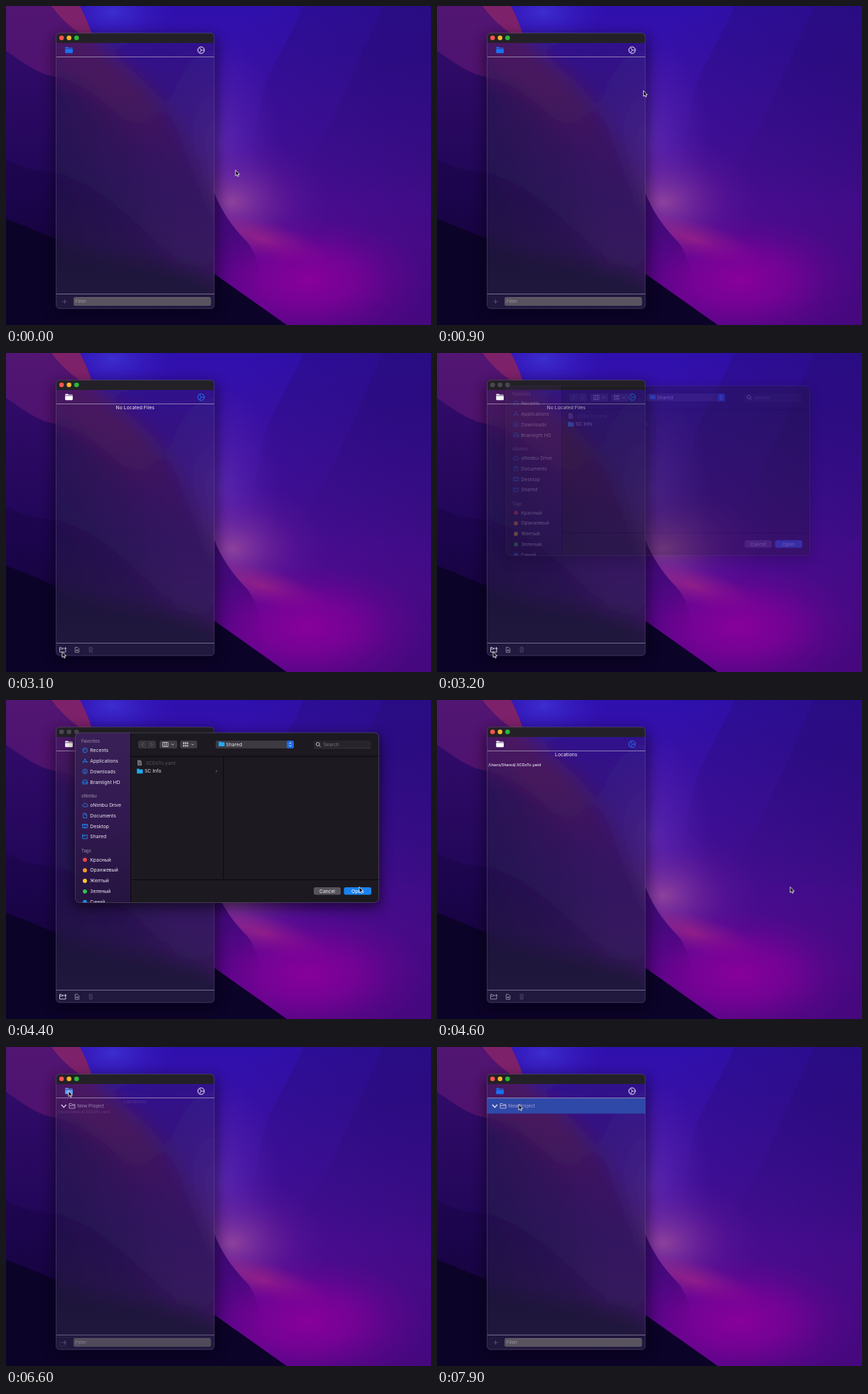
These frames come from a looping animation (598x448 px, 8000 ms). An HTML page:

```html
<!DOCTYPE html>
<html lang="en">
<head>
<meta charset="utf-8">
<title>Locating a file</title>
<style>
html, body { margin: 0; width: 100%; height: 100%; overflow: hidden; background: #1a0748; }
svg { display: block; width: 100vw; height: 100vh; }
text { font-family: Inter, "Noto Sans", sans-serif; white-space: pre; }
</style>
</head>
<body>
<svg id="stage" viewBox="0 0 598 448">
<defs>
  <linearGradient id="sky" x2="0" y2="1">
    <stop stop-color="#2f10ae"/><stop offset=".25" stop-color="#3b10a2"/><stop offset=".5" stop-color="#450f96"/>
    <stop offset=".75" stop-color="#560a92"/><stop offset="1" stop-color="#560686"/>
  </linearGradient>
  <linearGradient id="east">
    <stop offset=".55" stop-color="#2a0a70" stop-opacity="0"/><stop offset="1" stop-color="#2a0a70" stop-opacity=".38"/>
  </linearGradient>
  <linearGradient id="band" gradientUnits="userSpaceOnUse" x1="400" y1="60" x2="370" y2="260">
    <stop stop-color="#250a6c" stop-opacity=".27"/><stop offset="1" stop-color="#2c0870" stop-opacity="0"/>
  </linearGradient>
  <linearGradient id="mass" gradientUnits="userSpaceOnUse" x1="0" y1="0" x2="0" y2="448">
    <stop stop-color="#521572"/><stop offset=".25" stop-color="#4c126f"/>
    <stop offset=".6" stop-color="#400b78"/><stop offset=".8" stop-color="#4a0780"/><stop offset="1" stop-color="#5c068a"/>
  </linearGradient>
  <linearGradient id="shade" gradientUnits="userSpaceOnUse" x1="0" y1="70" x2="0" y2="448">
    <stop stop-color="#300b68"/><stop offset=".5" stop-color="#200656"/><stop offset="1" stop-color="#0c0224"/>
  </linearGradient>
  <linearGradient id="fadeEast" gradientUnits="userSpaceOnUse" x1="60" y1="0" x2="240" y2="0">
    <stop stop-color="#fff"/><stop offset="1" stop-color="#000"/>
  </linearGradient>
  <linearGradient id="tint" x2="0" y2="1">
    <stop stop-color="#241c3c" stop-opacity=".25"/><stop offset=".5" stop-color="#261e48" stop-opacity=".45"/>
    <stop offset="1" stop-color="#2a2348" stop-opacity=".72"/>
  </linearGradient>
  <linearGradient id="side" x2="0" y2="1">
    <stop stop-color="#392057"/><stop offset=".5" stop-color="#321a50"/><stop offset="1" stop-color="#251440"/>
  </linearGradient>
  <radialGradient id="magenta"><stop stop-color="#8a009c" stop-opacity=".95"/><stop offset=".4" stop-color="#84009a" stop-opacity=".7"/><stop offset=".75" stop-color="#80009a" stop-opacity=".2"/><stop offset="1" stop-color="#80009a" stop-opacity="0"/></radialGradient>
  <radialGradient id="pink"><stop stop-color="#9c4c9c" stop-opacity=".8"/><stop offset=".35" stop-color="#84369c" stop-opacity=".5"/><stop offset=".7" stop-color="#70209a" stop-opacity=".18"/><stop offset="1" stop-color="#6a1a98" stop-opacity="0"/></radialGradient>
  <radialGradient id="rose"><stop stop-color="#a82c80" stop-opacity=".75"/><stop offset=".5" stop-color="#a02884" stop-opacity=".4"/><stop offset="1" stop-color="#98208a" stop-opacity="0"/></radialGradient>
  <radialGradient id="violet"><stop stop-color="#6432b8" stop-opacity=".7"/><stop offset=".5" stop-color="#5c2ab4" stop-opacity=".35"/><stop offset="1" stop-color="#5424b0" stop-opacity="0"/></radialGradient>
  <radialGradient id="azure"><stop stop-color="#4034d8" stop-opacity=".8"/><stop offset="1" stop-color="#3418c0" stop-opacity="0"/></radialGradient>
  <radialGradient id="wine"><stop stop-color="#641868" stop-opacity=".6"/><stop offset=".5" stop-color="#5e1668" stop-opacity=".35"/><stop offset="1" stop-color="#5a1470" stop-opacity="0"/></radialGradient>
  <mask id="west"><rect width="598" height="448" fill="url(#fadeEast)"/></mask>
  <filter id="blur"><feGaussianBlur stdDeviation="13"/></filter>
  <filter id="soft" x="-20%" y="-20%" width="140%" height="140%"><feGaussianBlur stdDeviation="9"/></filter>
  <clipPath id="winClip"><rect x="70.5" y="38" width="222.5" height="387" rx="5"/></clipPath>
  <clipPath id="sheetClip"><rect x="97.5" y="46" width="427" height="238.5" rx="6"/></clipPath>
  <path id="edge" d="M0 0H104C112 15 117 28 121 40C145 68 186 92 212 126C248 172 270 228 293 262C302 286 318 310 338 330C352 345 362 380 372 448H0Z"/>
  <clipPath id="massClip"><use href="#edge"/></clipPath>

  <g id="wall">
    <rect width="598" height="448" fill="url(#sky)"/>
    <rect width="598" height="448" fill="url(#east)"/>
    <path d="M530 0C508 50 490 95 470 135C455 175 435 205 400 260H598V0Z" fill="url(#band)"/>
    <path d="M418 0C400 45 380 70 363 115C354 155 350 195 335 260H598V0Z" fill="url(#band)"/>
    <ellipse cx="150" cy="8" rx="90" ry="55" fill="url(#azure)"/>
    <ellipse cx="300" cy="195" rx="85" ry="150" fill="url(#violet)"/>
    <ellipse cx="318" cy="275" rx="135" ry="95" fill="url(#pink)"/>
    <ellipse cx="362" cy="328" rx="95" ry="27" fill="url(#rose)" transform="rotate(16 362 328)"/>
    <use href="#edge" fill="url(#mass)"/>
    <g clip-path="url(#massClip)">
      <ellipse cx="140" cy="115" rx="130" ry="115" fill="url(#wine)"/>
      <path d="M64 0H110L126 50C102 40 82 24 64 0Z" fill="#86246a" opacity=".85"/>
      <path d="M0 63C25 80 45 96 72 100C120 112 170 150 240 260V448H0Z" fill="url(#shade)" mask="url(#west)"/>
      <path d="M0 215C30 232 50 232 75 236C130 250 180 300 230 350V448H0Z" fill="#14033e" opacity=".35"/>
    </g>
    <ellipse cx="425" cy="385" rx="165" ry="88" fill="url(#magenta)"/>
    <path d="M0 299C40 313 60 325 90 333C150 355 230 350 293 376L395 448H0Z" fill="#0c0328"/>
  </g>

  <g id="addFolder" fill="none" stroke="currentColor" stroke-width=".8">
    <path d="M81 414.5H79L78 413.5H75.5V420H84V417"/><path d="M75.5 415.8H80.5"/><path d="M81.5 415H85.5M83.5 413V417"/>
  </g>
  <path id="folder" d="M83.2 59.6V58.8Q83.2 57.6 84.4 57.6H87L88.2 58.6H92.8Q93.9 58.6 93.9 59.6ZM83.2 60.2H93.9V65Q93.9 66.2 92.7 66.2H84.4Q83.2 66.2 83.2 65Z"/>
  <g id="gear" fill="none" stroke="currentColor" stroke-width=".9">
    <circle cx="274.5" cy="62" r="4.4"/><circle cx="274.5" cy="62" r="5" stroke-width=".6" stroke-dasharray=".9 .9"/>
    <path d="M278.5 62H274.7L272.6 58.5M274.7 62L272.6 65.5"/>
  </g>
</defs>

<use href="#wall"/>
<rect x="67" y="42" width="230" height="390" rx="8" fill="#05000f" opacity=".48" filter="url(#soft)"/>
<g clip-path="url(#winClip)">
  <use href="#wall" filter="url(#blur)"/>
  <rect x="70" y="38" width="224" height="388" fill="url(#tint)"/>
  <rect x="70" y="38" width="224" height="14" fill="#232127"/>
  <rect id="row" x="70" y="72" width="224" height="21.5" fill="#2f49a8"/>
  <path d="M71 71.5H293" stroke="#c9bcd8" stroke-opacity=".6"/>
</g>
<rect x="70.5" y="38" width="222.5" height="387" rx="5" fill="none" stroke="#a79bb8" stroke-opacity=".32" stroke-width=".8"/>
<g id="lights"></g>
<use id="filesTab" href="#folder"/>
<use id="gearTab" href="#gear"/>

<g id="filesView">
  <path d="M71 404.5H293" stroke="#c9bcd8" stroke-opacity=".5"/>
  <path d="M79.5 415H85.5M82.5 412V418" stroke="#5c5372" stroke-width=".9"/>
  <rect x="95" y="409" width="193.5" height="12" rx="2.5" fill="#59535f"/>
  <path d="M96 409.4H287" stroke="#77717c" stroke-width=".7"/>
  <g id="filter"></g>
</g>
<g id="project">
  <path d="M77.8 81L81.3 84.7L84.8 81" fill="none" stroke="#eee9f6" stroke-width="1.3"/>
  <path d="M89 86V79.5H92L93 80.7H97V86ZM89 82.3H97" fill="none" stroke="#c6bcd8" stroke-width=".9"/>
  <g id="projectName"></g>
</g>
<g id="placesView">
  <path d="M71 407.5H293" stroke="#c9bcd8" stroke-opacity=".5"/>
  <use id="addBtn" href="#addFolder"/>
  <g fill="none" stroke="#a49cb4" stroke-width=".8">
    <path d="M97.3 413.3H100.5L102.7 415.5V420.3H97.3ZM98.5 417.5H101.5M100 416V419"/>
    <path d="M116.3 414.3H122M118 414V413.2H120.3V414M117 414.5L117.4 420.3H121L121.4 414.5M118.4 416V419M120 416V419" stroke="#50476a"/>
  </g>
  <g id="none"></g>
  <g id="found"></g>
</g>

<g id="sheet">
  <rect x="95" y="50" width="432" height="242" rx="8" fill="#000" opacity=".55" filter="url(#soft)"/>
  <g clip-path="url(#sheetClip)">
    <rect x="97" y="46" width="78" height="239" fill="url(#side)"/>
    <rect x="175" y="46" width="350" height="239" fill="#1c1a20"/>
    <path d="M175.5 46V285M175 79.3H525M306 80V251M175 252.5H525" stroke="#09080c"/>
    <g id="sidebar"></g>
  </g>
  <rect x="97.5" y="46" width="427" height="238.5" rx="6" fill="none" stroke="#8a8590" stroke-opacity=".5" stroke-width=".7"/>
  <g id="controls"></g>
</g>
<path id="cursor" d="M0 0V8L1.8 6.4L3 9L4.4 8.4L3.2 5.9H5.6Z" fill="#08060c" stroke="#fff" stroke-width=".8"/>
</svg>

<script>
const $ = id => document.getElementById(id);
const LOOP = 8000, BLUE = '#1c8cf5', ACCENT = '#1a72f0';

const label = (x, y, str, size = 6.8, fill = '#ece8f2', extra = '') =>
  `<text x="${x}" y="${y}" font-size="${size}" fill="${fill}" ${extra}>${str}</text>`;
const box = (x, y, w, h, fill, r = 2.5) =>
  `<rect x="${x}" y="${y}" width="${w}" height="${h}" rx="${r}" fill="${fill}"/>`;
const line = (d, color, width = .9) =>
  `<path d="${d}" fill="none" stroke="${color}" stroke-width="${width}"/>`;
const middle = 'text-anchor="middle"';

const lights = [['#f4554b', 78.2], ['#f6b32c', 88.7], ['#27b93d', 99.3]];
$('lights').innerHTML = lights.map(([c, x]) => `<circle cx="${x}" cy="44.8" r="3.3" fill="${c}"/>`).join('');
$('filter').innerHTML = label(97.8, 417.4, 'Filter', 6.4, '#9d97a3');
$('projectName').innerHTML = label(100.3, 85.2, 'New Project', 6.5, '#b9aed4', 'font-weight="500" opacity=".75"');
$('none').innerHTML = label(181.7, 78.8, 'No Located Files', 6.85, '#f3eff8', middle);
$('found').innerHTML = label(181.7, 78.8, 'Locations', 6.8, '#f3eff8', middle) +
  label(72.3, 93.2, '/Users/Shared/.XCDoTo.yaml', 5.3, '#f3eff8', 'font-weight="500"');

// Sidebar icons are drawn around their own centre
const icons = {
  clock: 'M3.3 0A3.3 3.3 0 1 1 -3.3 0A3.3 3.3 0 1 1 3.3 0M0 -2V0H-1.7',
  apps: 'M-3 3L.5 -3.3M3 3L-.5 -3.3M-3.6 1.2H3.6',
  down: 'M3.3 0A3.3 3.3 0 1 1 -3.3 0A3.3 3.3 0 1 1 3.3 0M0 -1.8V1.7M-1.4 .4L0 1.8L1.4 .4',
  disk: 'M-3.5 .3L-2.4 -2.6H2.4L3.5 .3V2.7H-3.5ZM-3.5 .5H3.5M1.3 1.7H2.3',
  cloud: 'M-2.3 2.4A1.7 1.7 0 0 1 -2.3 -.8A2.3 2.3 0 0 1 2 -1A1.7 1.7 0 0 1 2.4 2.4Z',
  doc: 'M-2.4 -3.2H.6L2.5 -1.2V3.2H-2.4ZM.5 -3.2V-1H2.5',
  desk: 'M-3.6 -2.6H3.6V2.6H-3.6ZM-3.6 -1.2H3.6M-2 1.4H2',
  share: 'M1 -2H-.6L-1.4 -2.8H-3.6V2.8H3.2V0M-3.6 -1H1M1.5 -1.8H4M2.8 -3V-.5'
};
const groups = [
  ['Favorites', 58.2, 70.6, [['clock', 'Recents'], ['apps', 'Applications'], ['down', 'Downloads'], ['disk', 'Bramlight HD']]],
  ['oNimbu', 134.8, 147.4, [['cloud', 'oNimbu Drive'], ['doc', 'Documents'], ['desk', 'Desktop'], ['share', 'Shared']]],
  ['Tags', 211.8, 224, [['#f0463e', 'Красный'], ['#f89a2a', 'Оранжевый'], ['#f8ca2e', 'Желтый'], ['#2dc94a', 'Зеленый'], [BLUE, 'Синий']]]
];
$('sidebar').innerHTML = groups.map(([title, head, top, rows]) =>
  label(106, head + 2.1, title, 5.9, '#90839f', 'font-weight="500"') +
  rows.map(([icon, name], i) => {
    const y = top + i * 14.85;
    const mark = icons[icon]
      ? `<g transform="translate(111.2 ${y})">${line(icons[icon], BLUE, .85)}</g>`
      : `<circle cx="111" cy="${y + .3}" r="2.9" fill="${icon}"/>`;
    return mark + label(118.3, y + 2.5, name);
  }).join('')).join('');

const smallFolder = (x, y) => `<path transform="translate(${x - 62} ${y - 46}) scale(.75)" d="M83 59V66.5H94V58.8H88.2L87 57.7H83Z" fill="#22a8f2"/>`;
const down = (x, y) => line(`M${x} ${y}l1.7 1.7l1.7 -1.7`, '#c9c5cd');
const grid = (x, y) => [0, 1].map(r => [0, 1, 2].map(c => box(x + c * 2.7, y + r * 3.6, 2, 2.6, '#b9b5be', .3)).join('')).join('');
$('controls').innerHTML =
  box(186, 57, 25, 11, '#39363c') + line('M198.5 58V67', '#1c1a20') +
  line('M193.4 60L191 62.4L193.4 64.8M203.7 60L206.1 62.4L203.7 64.8', '#6f6b73') +
  box(216, 57, 25, 11, '#3f3c43') + line('M220.5 59.5H228V65.5H220.5ZM223 59.5V65.5M225.5 59.5V65.5', '#d8d4dc', .8) + down(232.8, 61.6) +
  box(245, 57, 24, 11, '#3f3c43') + grid(249, 59.3) + down(261, 61.6) +
  box(295, 57, 110, 11, '#3d3a42') + smallFolder(299, 61.2) + label(309.3, 64.9, 'Shared') +
  box(395, 57, 10, 11, '#1d68dc') + line('M398.4 61.5L400 59.8L401.6 61.5M398.4 63.5L400 65.2L401.6 63.5', '#fff') +
  box(432.5, 57, 81, 11, '#27252b') + line('M433 67.8H513', '#46434a', .6) +
  `<circle cx="438.8" cy="62" r="2.4" fill="none" stroke="#d0ccd4" stroke-width=".9"/>` + line('M440.6 63.8L442.6 65.8', '#d0ccd4') +
  label(446.5, 64.9, 'Search', 6.7, '#77737c') +
  `<path d="M185 84.5H189L191 86.5V92H185Z" fill="#77747c"/>` + line('M186.4 88H189.6M186.4 90H189.6', '#2a282e', .7) +
  label(195, 90.6, '.XCDoTo.yaml', 6.6, '#56535b') +
  smallFolder(184, 99.3) + label(195, 102.4, 'SC Info') +
  line('M295.2 98.3L296.8 100L295.2 101.7', '#8a868f', .7) +
  box(433, 263, 38, 10.5, '#57545b') + label(452, 270.6, 'Cancel', 6.7, '#efecf2', middle) +
  box(475.5, 263, 38.5, 10.5, '#1a82ee') + label(494.7, 270.6, 'Open', 6.8, '#fff', middle);

// Pointer stops: time, x, y
const stops = [
  [0, 323, 230.5], [430, 323, 230.5], [1200, 274, 62.5], [1500, 274, 62.5],
  [2250, 107, 376], [2700, 79, 419.5], [3300, 79, 419.5], [3700, 150, 317],
  [4350, 497, 262.5], [4830, 497, 262.5], [5600, 79, 90], [5750, 79, 90],
  [6300, 88, 61.5], [6830, 88, 61.5], [7700, 110, 78], [7900, 115, 80.5], [LOOP, 115, 80.5]
];

// Hermite curve through the stops, at rest wherever the pointer waits
function pointerAt(t) {
  let i = 0;
  while (i < stops.length - 2 && t >= stops[i + 1][0]) i++;
  const a = stops[i], b = stops[i + 1], span = b[0] - a[0], p = (t - a[0]) / span;
  const slope = (k, axis) => {
    const l = stops[k - 1], c = stops[k], r = stops[k + 1];
    if (!l || !r) return 0;
    const u = c[axis] - l[axis], v = r[axis] - c[axis];
    if (u * v <= 0) return 0;
    const su = u / (c[0] - l[0]), sv = v / (r[0] - c[0]);
    return 2 * su * sv / (su + sv);
  };
  return [1, 2].map(axis =>
    a[axis] * (1 + 2 * p) * (1 - p) ** 2 + b[axis] * p * p * (3 - 2 * p) +
    span * (slope(i, axis) * p * (1 - p) ** 2 - slope(i + 1, axis) * p * p * (1 - p)));
}

const ramp = (t, from, to) => Math.min(1, Math.max(0, (t - from) / (to - from)));
const show = (id, opacity) => {
  $(id).setAttribute('opacity', opacity);
  $(id).style.display = opacity > 0 ? '' : 'none';
};
const color = (id, c) => { $(id).style.color = c; $(id).style.fill = c; };

function draw(t) {
  const places = t < 4000 ? ramp(t, 1350, 1500) : 1 - ramp(t, 6460, 6625);
  const onGear = t >= 1400 && t < 6500;
  const pressed = t >= 6500 && t < 6700;
  show('placesView', places);
  show('filesView', 1 - places);
  show('project', t > 4000 ? 1 - places : 0);
  show('none', t < 4600 ? 1 : 0);
  show('found', t >= 4600 ? 1 : 0);
  show('row', t >= 7400 ? 1 : 0);

  const open = t < 4600 ? ramp(t, 3120, 3400) : 0;
  show('sheet', open);
  [...$('lights').children].forEach((dot, i) => dot.setAttribute('fill', open ? '#4b484f' : lights[i][0]));

  color('filesTab', onGear ? '#fff' : pressed ? '#5aa2fa' : ACCENT);
  color('gearTab', onGear ? (t < 1600 ? '#2a62dc' : '#1c7cf4') : '#f0ecf6');
  color('addBtn', open ? '#f4f0fa' : t >= 2900 && t < 4600 ? '#cfc8da' : '#a49cb4');

  const [x, y] = pointerAt(t);
  $('cursor').setAttribute('transform', `translate(${x.toFixed(2)} ${y.toFixed(2)})`);
}

const start = performance.now();
function tick() {
  draw((performance.now() - start) % LOOP);
  requestAnimationFrame(tick);
}
tick();
</script>
</body>
</html>
```
